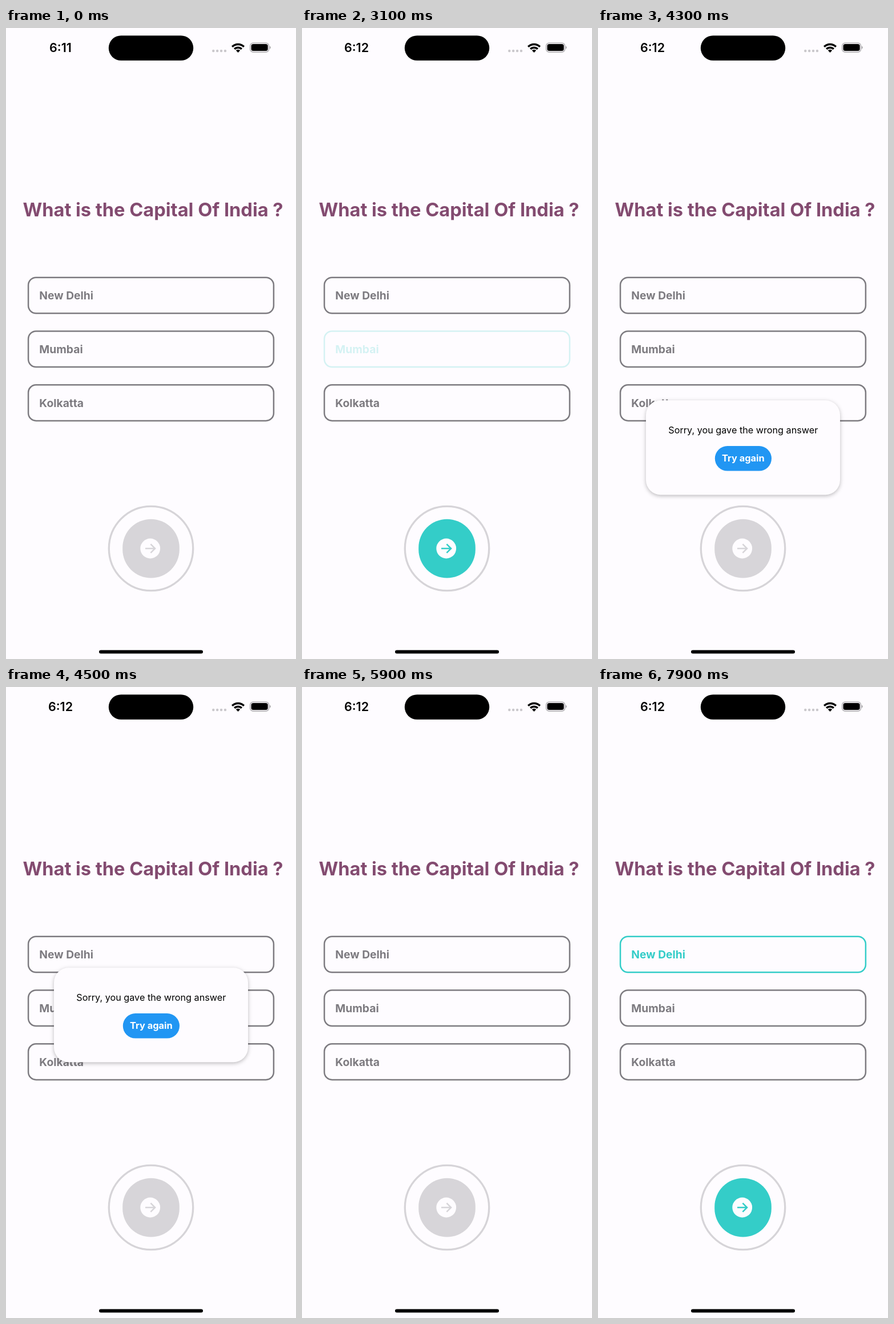
An HTML page that plays this animation: 508 px wide and 1102 px high, repeating every 8 s.

```html
<!DOCTYPE html>
<html lang="en">
<head>
<meta charset="utf-8">
<title>Quiz</title>
<style>
  :root { --bg: #fefcff; --grey: #7d7b80; --pale: #d7d5d9; --teal: #34cdc8; }
  html, body { margin: 0; width: 100%; height: 100%; overflow: hidden; background: var(--bg); }
  svg { display: block; width: 100%; height: 100%; font-family: Inter, sans-serif; }
  .mid { text-anchor: middle; }
  .clock { font-size: 21.5px; font-weight: 600; }
  .title { font-size: 32.6px; font-weight: 700; fill: #834b70; }
  .option { color: var(--grey); font-size: 19.3px; font-weight: 700; }
  .option rect { fill: none; stroke: currentColor; stroke-width: 2.5; }
  .option text { fill: currentColor; }
  .next { color: var(--pale); }
  .card { filter: drop-shadow(0 2.6px 3.5px #0004); }

  .early, .late, .first, .second, .next, .modal { animation: 8s step-end infinite; }
  .early { animation-name: early; }
  .late { animation-name: late; }
  .first { animation-name: first; }
  .second { animation-name: second; }
  .next { animation-name: next; }
  .modal { animation-name: modal; }

  @keyframes early { 0% { opacity: 1 } 5%, 100% { opacity: 0 } }
  @keyframes late { 0% { opacity: 0 } 5%, 100% { opacity: 1 } }
  @keyframes second {
    0% { color: var(--grey); opacity: 1 }
    38.75% { color: var(--teal); opacity: .2 }
    40% { opacity: .6 }
    41.25% { opacity: 1 }
    51.25%, 100% { color: var(--grey); opacity: 1 }
  }
  @keyframes first {
    0% { color: var(--grey); opacity: 1 }
    96.25% { opacity: .2 }
    97.5% { color: var(--teal); opacity: .6 }
    98.75%, 100% { color: var(--teal); opacity: 1 }
  }
  @keyframes next {
    0% { color: var(--pale); opacity: 1 }
    38.75% { color: var(--teal) }
    50% { opacity: .6 }
    51.25% { color: var(--pale); opacity: .3 }
    52.5% { opacity: .7 }
    53.75% { opacity: 1 }
    97.5%, 100% { color: var(--teal); opacity: 1 }
  }
  @keyframes modal {
    0% { transform: translateY(1102px) }
    51.25% { transform: translateY(860px) }
    52.5% { transform: translateY(440px) }
    53.75% { transform: translateY(160px) }
    55% { transform: translateY(40px) }
    56.25% { transform: translateY(0) }
    72.5% { transform: translateY(159px) }
    73.75%, 100% { transform: translateY(1102px) }
  }
</style>
</head>
<body>
<svg viewBox="0 0 508 1102">
  <!-- status bar -->
  <g class="clock mid">
    <text class="early" x="95.5" y="42.3">6:11</text>
    <text class="late" x="95.5" y="42.3">6:12</text>
  </g>
  <rect x="179.8" y="13.2" width="148.4" height="43.6" rx="21.8"/>
  <path d="M363.2 40h.1m6.8 0h.1m6.8 0h.1m6.8 0h.1" stroke="#cac8cc" stroke-width="4.4" stroke-linecap="round"/>
  <g fill="none" stroke="#000" stroke-width="3.5">
    <path d="M396.2 32.7a14.6 14.6 0 0 1 20.6 0"/>
    <path d="M400.2 36.8a8.9 8.9 0 0 1 12.6 0"/>
  </g>
  <path d="M406.5 43l-3.6-3.7a5.1 5.1 0 0 1 7.2 0z"/>
  <rect x="427.6" y="26.2" width="33" height="15.8" rx="5.2" fill="none" stroke="#a6a4a8" stroke-width="1.3"/>
  <rect x="429.5" y="28.1" width="29.2" height="12" rx="3.6"/>
  <path d="M462 31.4q1.8 .8 1.8 2.7t-1.8 2.7z" fill="#a6a4a8"/>

  <text class="title mid" x="257.5" y="329.3">What is the Capital Of India ?</text>

  <g class="option first">
    <rect x="39.1" y="435.7" width="429.8" height="62.6" rx="13.5"/>
    <text x="58.3" y="474">New Delhi</text>
  </g>
  <g class="option second">
    <rect x="39.1" y="529.5" width="429.8" height="62.6" rx="13.5"/>
    <text x="58.3" y="567.8">Mumbai</text>
  </g>
  <g class="option">
    <rect x="39.1" y="623.3" width="429.8" height="62.6" rx="13.5"/>
    <text x="58.3" y="661.6">Kolkatta</text>
  </g>

  <circle cx="254" cy="909" r="73.7" fill="none" stroke="#d6d4d8" stroke-width="3.3"/>
  <g class="next">
    <rect x="204.2" y="857.7" width="99.6" height="102.8" rx="49.8" fill="currentColor"/>
    <circle cx="252.7" cy="909" r="17.4" fill="#fefcff"/>
    <path d="M244 909H261M253.4 901.3L261.1 909L253.4 916.7" fill="none" stroke="currentColor" stroke-width="2.5"/>
  </g>

  <rect x="163" y="1086.6" width="182" height="6" rx="3"/>

  <g class="modal mid">
    <rect class="card" x="84" y="490.3" width="340" height="165" rx="25.8" fill="#fefcff"/>
    <text x="254.3" y="547.8" font-size="16.2">Sorry, you gave the wrong answer</text>
    <rect x="204.8" y="570" width="99.2" height="43.6" rx="21.8" fill="#2196f3"/>
    <text x="254.4" y="597.4" font-size="16.4" font-weight="700" fill="#fff">Try again</text>
  </g>
</svg>
</body>
</html>
```
